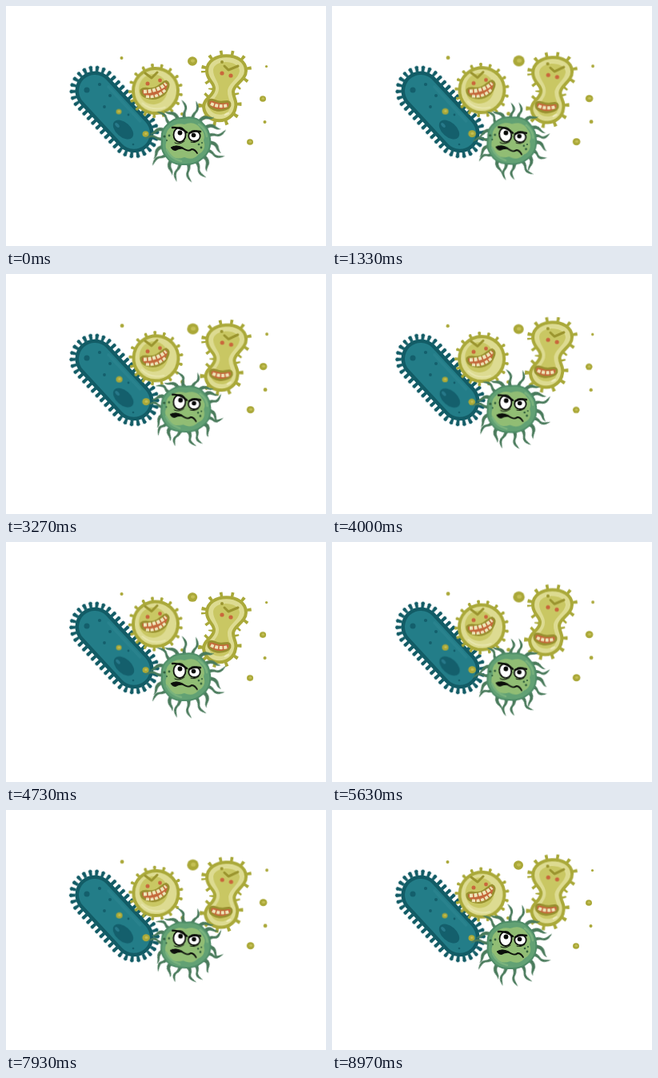
An HTML page without scripts that plays this animation: 400x300 px, repeating every 9.01 s.

```html
<!DOCTYPE html>
<html lang="en">
<head>
<meta charset="utf-8">
<title>Microbes</title>
<style>
html, body { margin: 0; width: 100%; height: 100%; overflow: hidden; background: #fff; }
svg { display: block; width: 400px; height: 300px; }
path, line, ellipse { stroke-linejoin: round; }
.line { fill: none; stroke-linecap: round; }

/* rod */
.cilia { fill: none; stroke: #125c66; stroke-width: 7; stroke-dasharray: .5 .5; stroke-dashoffset: -.25; }
.tips { fill: none; stroke: #125c66; stroke-width: 4; stroke-linecap: round; stroke-dasharray: 0 1; stroke-dashoffset: -.5; }
.cilia, .tips { animation: ripple 9.01s linear infinite; }
.nucleus { animation: drift 9.01s ease-in-out infinite; }

/* yellow cells */
.spikes { fill: none; stroke: #a8a838; stroke-dasharray: .28 .72; stroke-dashoffset: -.36; }
.knobs { fill: none; stroke: #a8a838; stroke-width: 3.6; stroke-linecap: round; stroke-dasharray: 0 1; stroke-dashoffset: -.5; }
.rim { stroke: #aaa93a; stroke-width: 4; fill: #dddb91; }
.shade { fill: #c9c763; }
.brow { stroke: #9b952f; stroke-width: 3; }
.mouth { fill: #c4683b; stroke: #99902f; stroke-width: 2.8; }
.teeth { fill: none; stroke: #eee5b8; stroke-dasharray: 4 1.6; }
.red { fill: #c9673c; }
.ball { transform-origin: 187px 106px; animation: ball 9.01s ease-in-out infinite; }
.hop { animation: hop 1.802s ease-in-out infinite; }
.bob { animation: bob 1.802s ease-in-out infinite; }
.peanut { transform-origin: 275px 78px; animation: lean 9.01s ease-in-out infinite; }

/* green cell */
.arm { transform-origin: 0 -27px; animation: reach 4.505s ease-in-out infinite; }
.bend { animation-name: curl; }
.cell { transform-origin: 225px 169px; animation: squash 4.505s ease-in-out infinite; }
.face { transform-origin: 222px 168px; animation: face 4.505s ease-in-out infinite; }
.eye { transform-origin: 217px 161px; animation: tilt 4.505s ease-in-out infinite; }
.pupils { animation: look 4.505s ease-in-out infinite; }

.drop { transform-box: fill-box; transform-origin: center; animation: float 4.505s ease-in-out infinite; }

/* nine and a half sways per loop */
@keyframes lean {
  0%, 10.526%, 21.053%, 31.579%, 42.105%, 52.632%, 63.158%, 73.684%, 84.211%, 94.737% { transform: none; }
  5.263%, 15.789%, 26.316%, 36.842%, 47.368%, 57.895%, 68.421%, 78.947%, 89.474%, 100% { transform: rotate(-3deg); }
}
@keyframes ball {
  0%, 10.526%, 21.053%, 31.579%, 42.105%, 52.632%, 63.158%, 73.684%, 84.211%, 94.737% { transform: rotate(-2deg); }
  5.263%, 15.789%, 26.316%, 36.842%, 47.368%, 57.895%, 68.421%, 78.947%, 89.474%, 100% { transform: translate(.5px, -.3px) rotate(3deg); }
}
@keyframes ripple {
  0%, 10.526%, 21.053%, 31.579%, 42.105%, 52.632%, 63.158%, 73.684%, 84.211%, 94.737% { transform: none; }
  5.263%, 15.789%, 26.316%, 36.842%, 47.368%, 57.895%, 68.421%, 78.947%, 89.474%, 100% { transform: translate(.6px, -.3px); }
}
@keyframes bob {
  0%, 100% { transform: none; }
  12.5% { transform: translateY(-2.5px); }
  62.5% { transform: translateY(7px); }
  76% { transform: translateY(1.8px); }
}
@keyframes hop {
  0%, 100% { transform: none; }
  12.5% { transform: translateY(.6px); }
  62.5% { transform: translateY(-3.5px); }
  76% { transform: translateY(-.4px); }
}
@keyframes drift {
  0%, 100%, 30% { transform: none; }
  52% { transform: translate(1px, .6px); }
  75% { transform: translate(-.3px, .3px); }
}
@keyframes reach {
  0%, 100% { transform: none; }
  27% { transform: scale(1.05, .85) rotate(9deg); }
  54% { transform: scale(1, .95) rotate(-8deg); }
  73% { transform: scale(1.1, .85) rotate(-13deg); }
}
@keyframes curl {
  0%, 100% { transform: none; }
  27% { transform: scale(1, .9) rotate(-8deg); }
  54% { transform: scale(1.1, .95) rotate(12deg); }
  73% { transform: scale(1, .84) rotate(7deg); }
}
@keyframes squash {
  0%, 100% { transform: none; }
  27% { transform: rotate(5deg) translateY(-.5px); }
  54% { transform: scale(1.01, .98) rotate(-3deg); }
  73% { transform: scale(1.01, .97) rotate(4deg); }
}
@keyframes face {
  0%, 100% { transform: none; }
  27% { transform: translate(-.8px, .4px) rotate(4deg); }
  54% { transform: translate(-.6px, .6px) rotate(5deg); }
  73% { transform: translate(-.6px, -.6px) rotate(3deg); }
}
@keyframes tilt {
  0%, 73%, 100% { transform: none; }
  27% { transform: rotate(-18deg); }
  54% { transform: rotate(-38deg) scale(1.05); }
}
@keyframes look {
  0%, 27%, 100% { transform: none; }
  54% { transform: translate(2.5px, 0); }
  73% { transform: translate(.8px, 0); }
}
@keyframes float {
  0%, 100% { transform: none; }
  27%, 73% { transform: translate(.6px, -.3px) scale(1.2); }
  54% { transform: translate(.2px, -.2px) scale(1.15, 1.02) rotate(18deg); }
}
</style>
</head>
<body>
<svg viewBox="0 0 400 300" xmlns="http://www.w3.org/2000/svg">
<defs>
  <g id="side">
    <path class="cilia" pathLength="9" d="M0-27H72"/>
    <path class="tips" pathLength="9" d="M0-29.5H72"/>
    <path class="cilia" pathLength="11" d="M72-27A27 27 0 0 1 72 27"/>
    <path class="tips" pathLength="11" d="M72-29.5A29.5 29.5 0 0 1 72 29.5"/>
  </g>
  <path id="long" d="M-5-25C-1-30-3-34 0-38C3-42 0-46-2-52C3-48 6-43 3-38C1-34 1-29 5-25Z"/>
  <path id="hook" d="M-5-25C-2-31-4-35 0-39C3-42 7-41 11-45C10-39 5-39 3-36C0-33 2-28 5-25Z"/>
  <path id="nut" d="M251 81C251 56 300 56 300 81C300 93 284 98 284 107C284 115 289 118 287 126C284 149 249 149 247 126C247 115 260 113 260 103C260 95 251 93 251 81Z"/>
  <g id="drop">
    <ellipse rx="4" ry="3.8" fill="#aaa838"/>
    <ellipse cx=".3" cy="-.3" rx="1.7" ry="1.4" fill="#c4bf55"/>
  </g>
</defs>

<!-- rod -->
<g transform="translate(111 106) rotate(47.2)">
  <use href="#side"/>
  <use href="#side" transform="rotate(180 36 0)"/>
  <path class="line" d="M0 0H72" stroke="#125c66" stroke-width="49"/>
  <path class="line" d="M0 0H72" stroke="#237d88" stroke-width="40"/>
  <path class="line" d="M8-16H66" stroke="#29828d" stroke-width="4"/>
</g>
<g fill="#145f6c">
  <circle cx="101" cy="105" r="3.5"/>
  <circle cx="117" cy="98" r="2.1"/>
  <circle cx="130" cy="112" r="2"/>
  <circle cx="123" cy="126" r="1.9"/>
  <circle cx="153" cy="136" r="1.4"/>
  <circle cx="159" cy="173" r="1.3"/>
  <g class="nucleus">
    <ellipse cx="146.5" cy="154.5" rx="15" ry="9" transform="rotate(42 146.5 154.5)"/>
    <ellipse cx="139" cy="149" rx="3.5" ry="2" transform="rotate(50 139 149)" fill="#28798a"/>
  </g>
</g>

<!-- round cell -->
<g class="hop">
  <g class="ball">
    <circle class="spikes" cx="187" cy="106" r="31" stroke-width="5" pathLength="17"/>
    <circle class="knobs" cx="187" cy="106" r="32.5" pathLength="17"/>
    <circle class="rim" cx="187" cy="106" r="28"/>
    <ellipse class="shade" cx="184" cy="104" rx="18" ry="19"/>
    <path class="line" d="M170 121Q181 132 198 127" stroke="#e7e5aa" stroke-width="2"/>
  </g>
  <path class="line brow" d="M174 84L182 90L189 83"/>
  <circle class="red" cx="177" cy="97" r="2.5"/>
  <circle class="red" cx="192.5" cy="93" r="2.4"/>
  <path class="mouth" d="M169 105C173 101 178 105 185 103C193 101 195 95 200 94Q205 96 202 103C198 114 185 118 175 114Q168 111 169 105Z"/>
  <path class="teeth" d="M172 107C183 107 194 103 200 97" stroke-width="4.5"/>
  <path class="teeth" d="M175 113C184 115 193 111 199 105" stroke-width="3.5"/>
</g>

<!-- peanut cell -->
<g class="bob">
  <g class="peanut">
    <use href="#nut" class="spikes" stroke-width="14" style="stroke-dasharray:3.2 9.3;stroke-dashoffset:-2"/>
    <use href="#nut" class="rim"/>
    <path class="shade" d="M259 80C260 66 291 67 292 81C291 91 277 97 277 107C277 116 282 120 280 128C276 139 257 138 254 127C256 118 266 113 266 103C266 94 259 90 259 80Z"/>
    <path class="line brow" d="M273 75L278 80L290 75"/>
    <circle cx="270" cy="70" r="2" fill="#9b952f"/>
    <circle class="red" cx="270" cy="84" r="2.6"/>
    <circle class="red" cx="281" cy="87" r="2.6"/>
    <path class="mouth" d="M253 120C255 114 261 119 267 120C273 121 279 117 280 122C281 129 270 131 263 130C256 128 252 125 253 120Z"/>
    <path class="teeth" d="M256 122Q266 127 278 124" stroke-width="4"/>
    <ellipse cx="276" cy="135" rx="3.5" ry="1.3" fill="#ece9b5" transform="rotate(-25 276 135)"/>
  </g>
</g>

<!-- loose drops -->
<g class="drop"><use href="#drop" transform="translate(233 69) scale(1.5)"/></g>
<g class="drop"><use href="#drop" transform="translate(321 116)"/></g>
<g class="drop"><use href="#drop" transform="translate(305 170)"/></g>
<g class="drop"><use href="#drop" transform="translate(141 132) scale(.85)"/></g>
<g class="drop"><use href="#drop" transform="translate(174.5 160)"/></g>
<g fill="#aaa838">
  <circle class="drop" cx="144.5" cy="65" r="2"/>
  <circle class="drop" cx="325.5" cy="75.5" r="1.6"/>
  <circle class="drop" cx="323.5" cy="145" r="2"/>
  <circle class="drop" cx="220" cy="135" r="2"/>
</g>

<!-- green cell -->
<g transform="translate(225 169)" fill="#4a7b5c">
  <g transform="rotate(-4)"><use href="#long" class="arm"/></g>
  <g transform="rotate(16)"><use href="#long" class="arm bend"/></g>
  <g transform="rotate(36)"><use href="#hook" class="arm bend"/></g>
  <g transform="rotate(57)"><use href="#hook" class="arm"/></g>
  <g transform="rotate(76)"><use href="#long" class="arm"/></g>
  <g transform="rotate(95)"><use href="#hook" class="arm bend"/></g>
  <g transform="rotate(113)"><use href="#long" class="arm"/></g>
  <g transform="rotate(132)"><use href="#hook" class="arm"/></g>
  <g transform="rotate(153)"><use href="#long" class="arm bend"/></g>
  <g transform="rotate(174)"><use href="#long" class="arm"/></g>
  <g transform="rotate(195)"><use href="#long" class="arm bend"/></g>
  <g transform="rotate(216) scale(-1 1)"><use href="#hook" class="arm"/></g>
  <g transform="rotate(236)"><use href="#long" class="arm"/></g>
  <g transform="rotate(255) scale(-1 1)"><use href="#hook" class="arm bend"/></g>
  <g transform="rotate(275)"><use href="#long" class="arm bend"/></g>
  <g transform="rotate(295) scale(-1 1)"><use href="#hook" class="arm"/></g>
  <g transform="rotate(317)"><use href="#long" class="arm"/></g>
  <g transform="rotate(338) scale(-1 1)"><use href="#hook" class="arm bend"/></g>
</g>
<g class="cell">
  <path d="M201 149Q210 139 222 140Q237 137 246 147Q254 154 255 166Q257 181 246 190Q236 199 223 198Q207 199 200 188Q193 180 195 168Q193 156 201 149Z" fill="#62a174" stroke="#4f8d68" stroke-width="2"/>
  <path d="M204 153Q213 145 223 148Q236 143 243 153Q250 160 247 168Q251 180 241 185Q234 194 223 189Q209 194 204 183Q197 178 201 168Q198 159 204 153Z" fill="#91bd74"/>
  <path class="line" d="M201 180Q206 191 219 194M241 148Q250 154 251 163" stroke="#79b27d" stroke-width="2.5"/>
</g>
<g class="face">
  <g fill="#fff" stroke="#0c0f0b" stroke-width="1.8">
    <ellipse class="eye" cx="217" cy="161" rx="7.5" ry="9"/>
    <ellipse cx="235.500" cy="162.500" rx="7.200" ry="6.500"/>
  </g>
  <g class="pupils" fill="#080a08">
    <circle cx="217.5" cy="158.5" r="2.9"/>
    <circle cx="234.500" cy="161.500" r="2.8"/>
  </g>
  <g class="line" stroke="#0c0f0b">
    <path d="M208 152Q217 151 226 158M229 159Q236 155 243 157" stroke-width="2.4"/>
    <path d="M211 171Q217 174 223 169M231 170Q236 172 241 168" stroke-width="1"/>
    <path d="M207 177Q213 174 220 177Q228 183 232 179Q236 179 239 184" stroke-width="1.8"/>
  </g>
  <path d="M206 177Q211 173 218 176L222 179Q217 178 212 181Q208 181 206 177Z" fill="#0c0f0b"/>
  <g fill="#315f3d">
    <circle cx="198" cy="163" r="1.6"/>
    <circle cx="204" cy="162" r="1.4"/>
    <circle cx="201" cy="168" r="1"/>
    <circle cx="241" cy="173" r="1.3"/>
    <circle cx="245" cy="171" r="1.1"/>
    <circle cx="244" cy="177" r="1.4"/>
  </g>
</g>
</svg>
</body>
</html>
```
